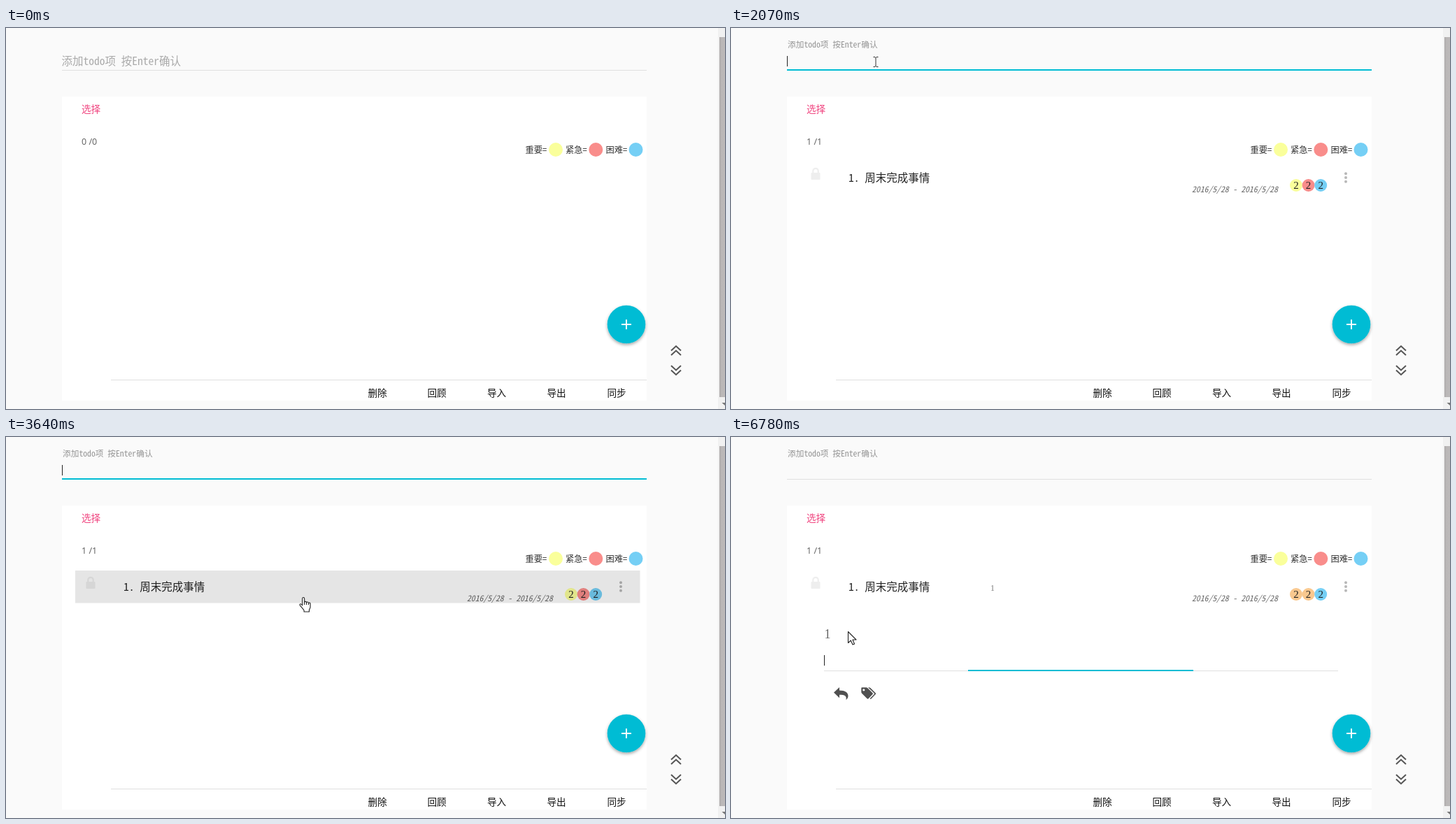
An HTML page for the animation above (8000 ms loop, 1028 px wide and 545 px high).

```html
<!DOCTYPE html>
<html lang="zh-CN">
<head>
<meta charset="utf-8">
<title>Todo</title>
<style>
html, body { margin: 0; width: 100%; height: 100%; overflow: hidden; background: #fafafa; }
svg { display: block; width: 1028px; height: 545px; }
text { font-family: "Noto Sans Mono CJK SC", "Noto Sans CJK SC", "Noto Sans CJK", monospace; white-space: pre; }
.large { font-size: 15.5px; }
.medium { font-size: 13.6px; }
.small { font-size: 11.7px; }
.legend { font-size: 12.3px; fill: #333; }
.counter { font: 12.5px "Noto Sans", sans-serif; fill: #666; }
.digit { font-family: "Liberation Serif", serif; }
.middle { text-anchor: middle; }
.rule { stroke: #e0e0e0; }
.focus { stroke: #00bcd4; stroke-width: 2; }
.caret { stroke: #222; }
.pointer { fill: #fff; stroke: #222; stroke-width: 1.1; stroke-linejoin: round; }
</style>
</head>
<body>
<svg viewBox="0 0 1028 545">
  <defs>
    <linearGradient id="thumb">
      <stop stop-color="#a9a6a6"/><stop offset=".25" stop-color="#b9b6b6"/><stop offset="1" stop-color="#bdbaba"/>
    </linearGradient>
    <filter id="shadow" x="-30%" y="-30%" width="160%" height="160%">
      <feDropShadow dx="0" dy="2" stdDeviation="2.2" flood-opacity=".36"/>
    </filter>
    <g id="hand" class="pointer">
      <path d="M3.2 12V2.2C3.2 0 6.2 0 6.2 2.2V7.2C6.5 6 9 6 9.1 7.7C9.6 6.6 11.8 6.8 12 8.5C12.8 7.6 14.6 8 14.6 9.8V14C14.6 16 13 17.5 13 19V21H5.6V19C4.2 17 2 14.5-.2 11.8C-1.2 10.2.8 9 2 10.5Z"/>
      <path d="M6.2 7V11M9.1 7.7V11M12 8.5V11"/>
    </g>
    <g id="tools" fill="#505050">
      <path d="M147 265.5 155 258V262.5C163.5 262.5 167.5 265.5 167.5 270.5C167.5 273 166 275 164.5 276C165.5 270.5 163 268.8 155 268.8V273.2Z"/>
      <path fill-rule="evenodd" d="M186.3 259.2Q186.3 258.2 187.3 258.2H193.2Q194.4 258.2 195.2 259L202.5 266.2Q203.4 267.2 202.5 268.1L196.5 274.3Q195.5 275.2 194.6 274.3L187.1 266.8Q186.3 266 186.3 264.8ZM189.8 260.2A1.6 1.6 0 1 0 189.8 263.4A1.6 1.6 0 1 0 189.8 260.2Z"/>
      <path d="M196 258.2H197.5Q198.6 258.2 199.4 259L206.7 266.2Q207.6 267.2 206.7 268.1L200.7 274.3Q199.5 275.3 198.5 274.3L204.7 268Q205.5 267.2 204.7 266.4Z"/>
    </g>
  </defs>

  <rect width="1028" height="545" fill="#fafafa"/>
  <rect x="80" y="98" width="836" height="435" fill="#fff"/>

  <!-- Scrollbar -->
  <rect x="1018" width="10" height="545" fill="#f1f1f1"/>
  <rect x="1020" y="13" width="8" height="515" fill="url(#thumb)"/>
  <path d="M1023.5 536H1028V540Z" fill="#777"/>

  <!-- Entry field -->
  <text data-in="0" class="large" x="79.5" y="53" fill="#aaa">添加todo项 按Enter确认</text>
  <text data-in="1" class="small" x="81" y="28.3" fill="#00bcd4">添加todo项 按Enter确认</text>
  <text data-in="2345" class="small" x="81" y="28.3" fill="#949494">添加todo项 按Enter确认</text>
  <text data-in="1" class="large" x="79.5" y="54" fill="#222">周末完成事情</text>
  <path data-in="045" class="rule" d="M80 60.5H916"/>
  <path data-in="123" class="focus" d="M80 60H916"/>
  <path data-in="1" class="caret" d="M181.5 41V55"/>
  <path data-in="23" class="caret" d="M80.5 40V55"/>

  <!-- Panel header and footer -->
  <text class="medium" x="108" y="121" fill="#f0447f">选择</text>
  <text data-in="0" class="counter" x="108" y="167">0 /0</text>
  <text data-in="12345" class="counter" x="108" y="167" id="count"></text>
  <text class="legend" x="742.5" y="178.7">重要=</text>
  <text class="legend" x="800" y="178.7">紧急=</text>
  <text class="legend" x="857.5" y="178.7">困难=</text>
  <circle cx="786" cy="174" r="10" fill="#faff9b"/>
  <circle cx="843.3" cy="174" r="10" fill="#f98d8b"/>
  <circle cx="900.5" cy="174" r="10" fill="#75cff5"/>
  <path class="rule" d="M150 503.5H916"/>
  <g class="medium middle" fill="#111">
    <text x="531" y="527">删除</text>
    <text x="616" y="527">回顾</text>
    <text x="701.5" y="527">导入</text>
    <text x="787" y="527">导出</text>
    <text x="873" y="527">同步</text>
  </g>

  <!-- Todo row -->
  <g data-in="2345">
    <rect x="114.5" y="207" width="13" height="10" rx="1" fill="#eee"/>
    <path d="M117.3 208V204.5A3.7 3.7 0 0 1 124.7 204.5V208" fill="none" stroke="#eee" stroke-width="2.2"/>
    <text class="large" x="168" y="220" fill="#222">1. 周末完成事情</text>
    <text class="small" x="659" y="235.3" fill="#666" font-style="italic">2016/5/28 - 2016/5/28</text>
    <g data-in="234">
      <circle cx="808" cy="225" r="9" fill="#faff9b"/>
      <circle cx="825.6" cy="225" r="9" fill="#f98d8b"/>
    </g>
    <g data-in="5" fill="#f9c88f">
      <circle cx="808" cy="225" r="9"/>
      <circle cx="825.6" cy="225" r="9"/>
    </g>
    <circle cx="843.2" cy="225" r="9" fill="#75cff5"/>
    <g class="middle" font-size="15" fill="#222">
      <text class="digit" x="808" y="230">2</text>
      <text class="digit" x="825.6" y="230">2</text>
      <text class="digit" x="843.2" y="230">2</text>
    </g>
    <g fill="#b8b8b8">
      <circle cx="879" cy="208.3" r="2"/>
      <circle cx="879" cy="214" r="2"/>
      <circle cx="879" cy="219.8" r="2"/>
    </g>
  </g>
  <rect data-in="3" x="99" y="191" width="807.5" height="46.5" fill-opacity=".1"/>
  <rect data-in="4" x="99" y="191" width="803" height="46.5" rx="2" fill-opacity=".035"/>

  <!-- Row details -->
  <use data-in="4" href="#tools"/>
  <g data-in="5">
    <use href="#tools" y="100"/>
    <text class="digit" x="371" y="220" font-size="11.6" fill="#777">1</text>
    <text class="digit" x="133.5" y="288" font-size="18" fill="#666">1</text>
    <path class="caret" d="M133.5 312V327"/>
    <path class="rule" d="M133 334.5H868"/>
    <path class="focus" d="M339 334H661"/>
  </g>

  <!-- Floating buttons -->
  <circle cx="887" cy="424" r="27.3" fill="#00bcd4" filter="url(#shadow)"/>
  <path d="M880 424H894M887 417V431" stroke="#fff" stroke-width="2"/>
  <path d="M951 461.5 958 455 965 461.5M951 468 958 461.5 965 468M951 483 958 489.5 965 483M951 489.5 958 496 965 489.5" fill="none" stroke="#555" stroke-width="2"/>

  <!-- Mouse pointers -->
  <path data-in="12" d="M203.5 41.5H206L207 42.5 208 41.5H210.5M207 42V55M203.5 55.5H206L207 54.5 208 55.5H210.5" fill="none" stroke="#333"/>
  <use data-in="3" href="#hand" x="420.5" y="229"/>
  <use data-in="4" href="#hand" x="154.5" y="272"/>
  <path data-in="5" class="pointer" d="M167.5 278.5V294.5L171.3 291 174 297 176.5 296 174 290H179Z"/>
</svg>
<script>
const LOOP = 8000;
const sceneStarts = [0, 500, 2070, 3640, 5210, 6780];
const parts = document.querySelectorAll('[data-in]');
const count = document.getElementById('count');
const origin = performance.now();
let current = -1;

function showScene(scene) {
  if (scene === current) return;
  current = scene;
  for (const part of parts) {
    part.style.display = part.dataset.in.includes(scene) ? '' : 'none';
  }
  count.textContent = scene > 1 ? '1 /1' : '0 /0';
}

function draw() {
  const time = Math.max(0, performance.now() - origin) % LOOP;
  showScene(sceneStarts.filter(start => start <= time).length - 1);
  requestAnimationFrame(draw);
}
draw();
</script>
</body>
</html>
```
